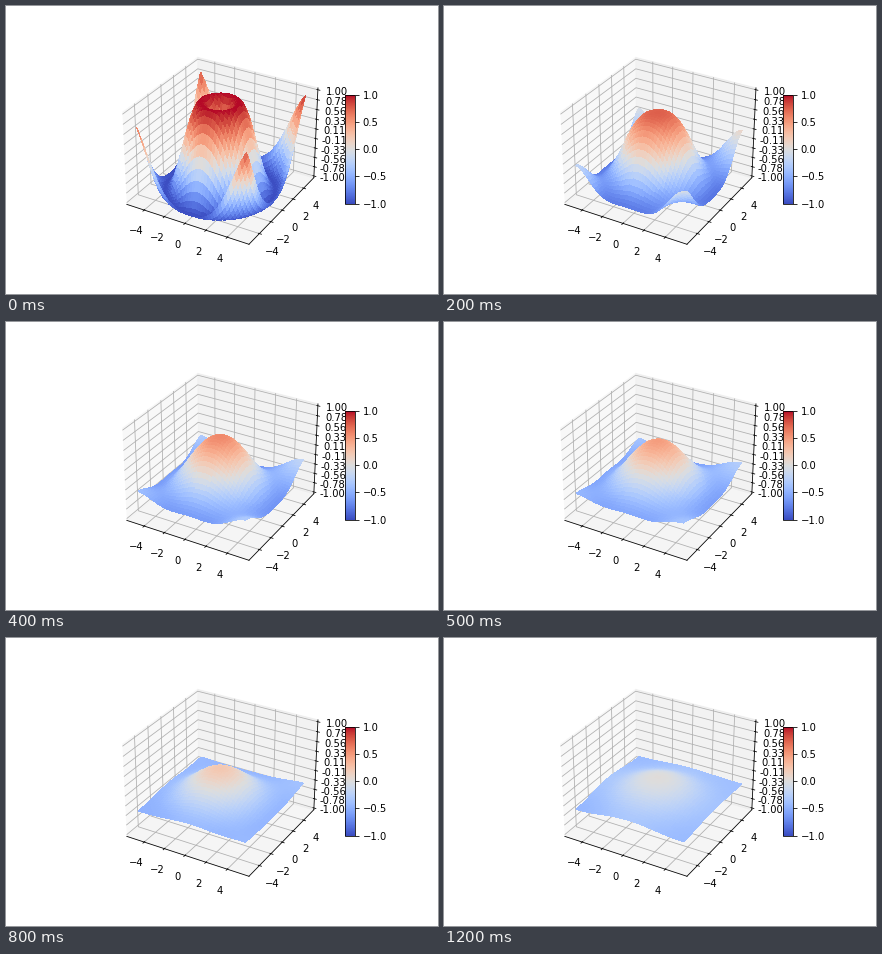
Write a matplotlib script that moves like this. It is 432 px wide and 288 px high and loops after 1.3 s.

```python
import matplotlib.pyplot as plt
import numpy as np
from matplotlib.animation import FuncAnimation
from matplotlib.cm import ScalarMappable
from matplotlib.colors import Normalize
from matplotlib.ticker import FormatStrFormatter

FRAMES, INTERVAL = 13, 100
STEP = 0.25
SUBSTEPS, RATE = 19, 0.25  # explicit heat-equation steps per frame

axis = np.arange(-5, 5.25 + STEP / 2, STEP)
X, Y = np.meshgrid(axis, axis)
Z0 = np.sin(np.hypot(X, Y))


def diffusion_matrix(n):
    """One frame of 1D diffusion with insulated ends."""
    lap = np.eye(n, k=1) + np.eye(n, k=-1) - 2 * np.eye(n)
    lap[0, 0] = lap[-1, -1] = -1
    return np.linalg.matrix_power(np.eye(n) + RATE * lap, SUBSTEPS)


def padded(lo, hi, margin):
    pad = (hi - lo) * margin
    return lo - pad, hi + pad


K = diffusion_matrix(len(axis))
norm = Normalize(-1, 1)

fig = plt.figure(figsize=(6, 4), dpi=72, facecolor="white")
fig.subplots_adjust(left=0.125, right=0.9, bottom=0.125, top=0.88)
ax = fig.add_subplot(projection="3d")

span = padded(*padded(axis[0], axis[-1], 0.05), 1 / 48)
ax.set_xlim(*span)
ax.set_ylim(*span)
ax.set_zlim(*padded(-1, 1, 1 / 48))
ax.set_xticks(range(-4, 5, 2))
ax.set_yticks(range(-4, 5, 2))
ax.set_zticks(np.linspace(-1, 1, 10))
ax.zaxis.set_major_formatter(FormatStrFormatter("%.02f"))

fig.colorbar(ScalarMappable(norm, "coolwarm"), ax=ax, shrink=0.5, aspect=10,
             ticks=np.linspace(-1, 1, 5))

surface = None


def update(i):
    global surface
    if surface is not None:
        surface.remove()
    k = np.linalg.matrix_power(K, i)
    surface = ax.plot_surface(X, Y, k @ Z0 @ k.T, cmap="coolwarm", norm=norm,
                              linewidth=0, antialiased=False)
    return (surface,)


anim = FuncAnimation(fig, update, frames=FRAMES, interval=INTERVAL,
                     repeat=True, repeat_delay=0, blit=False)
plt.show()
```
